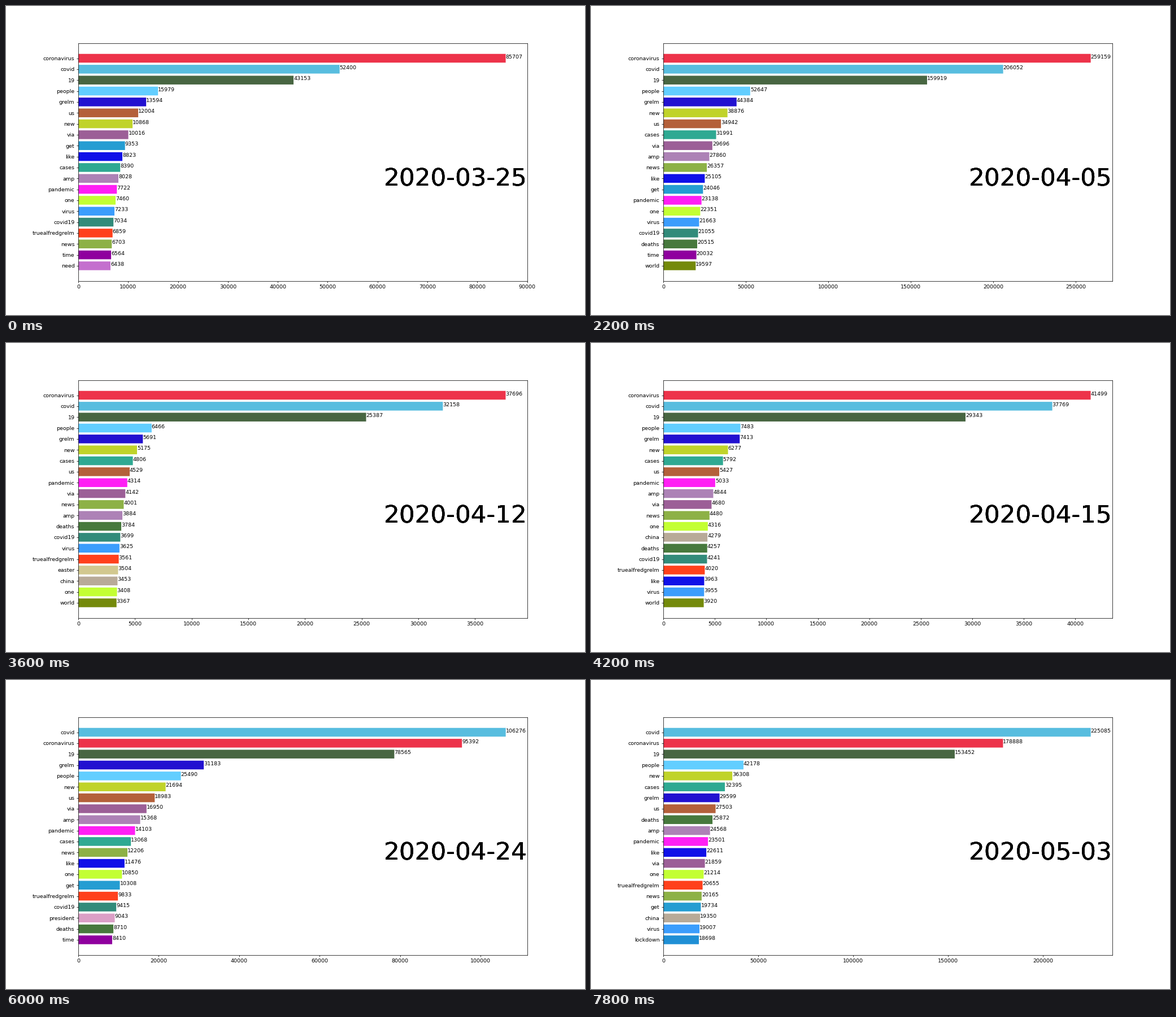
Write a matplotlib script that moves like this. It is 1025x547 px and loops after 8 s.

```python
import matplotlib.pyplot as plt
import numpy as np
from matplotlib.animation import FuncAnimation

W, H = 1025, 547
DPI = W / 15
DAYS, STEP = 40, 200
TOP = 20
START = np.datetime64("2020-03-25")

plt.rcParams["font.family"] = "DejaVu Sans"

# The katakana dash has no glyph in DejaVu Sans, so it shows as a box.
BOXED = "covid\u30fc19"
COLORS = {
    "coronavirus": "#ed334a", "covid": "#58bddf", "19": "#486642",
    "people": "#62ceff", "grelm": "#2211d0", "us": "#b4603a",
    "new": "#c0d32a", "via": "#9c5f97", "get": "#259dd2",
    "like": "#1010e8", "cases": "#2fa992", "amp": "#ad82b6",
    "pandemic": "#ff1ff4", "one": "#c3ff33", "virus": "#3b9dfc",
    "covid19": "#328b7a", "truealfredgrelm": "#ff401c", "news": "#8db146",
    "time": "#8f009e", "need": "#c46fce", BOXED: "#f0c44d",
    "china": "#b8aa98", "deaths": "#47793d", "world": "#748a0a",
    "easter": "#d2c88f", "president": "#db9fc6", "lockdown": "#1f8fd5",
}
WORDS = list(COLORS)

# Key days: day, counts of the first four ranks and the last, words by rank.
KEYS = [
    (0, (85707, 52400, 43153, 15979, 6438),
     "coronavirus covid 19 people grelm us new via get like cases amp "
     "pandemic one virus covid19 truealfredgrelm news time need"),
    (7, (257152, 197575, 158892, 47356, 22833),
     "coronavirus covid 19 people grelm us new via cases pandemic amp "
     + BOXED + " news like one covid19 china get time virus"),
    (11, (259159, 206052, 159919, 52647, 19597),
     "coronavirus covid 19 people grelm new us cases via amp news like "
     "get pandemic one virus covid19 deaths time world"),
    (18, (37696, 32158, 25387, 6466, 3367),
     "coronavirus covid 19 people grelm new cases us pandemic via news "
     "amp deaths covid19 virus truealfredgrelm easter china one world"),
    (25, (47172, 46803, 35592, 10546, 4725),
     "coronavirus covid 19 grelm people new cases us amp pandemic one "
     "china via like news covid19 deaths get world truealfredgrelm"),
    (30, (106276, 95392, 78565, 31183, 8410),
     "covid coronavirus 19 grelm people new us via amp pandemic cases "
     "news like one get truealfredgrelm covid19 president deaths time"),
    (39, (225085, 178888, 153452, 42178, 18698),
     "covid coronavirus 19 people new cases grelm us deaths amp pandemic "
     "like via one truealfredgrelm news get china virus lockdown"),
]


def key_counts(anchors, names):
    """Counts for every word: three leaders, then a hyperbolic tail."""
    *leaders, fourth, last = anchors
    t = np.linspace(0, 1, TOP - len(leaders))
    tail = last + (fourth - last) * (1 - t) / (1 + 4 * t)
    known = dict(zip(names.split(), [*leaders, *tail]))
    # Unranked words sit just below the last rank.
    return [known.get(word, 0.94 * last) for word in WORDS]


KEY_DAYS = [day for day, _, _ in KEYS]
KEY_LOGS = np.log([key_counts(anchors, names) for _, anchors, names in KEYS])


def ranking(day):
    counts = [round(float(np.exp(np.interp(day, KEY_DAYS, logs))))
              for logs in KEY_LOGS.T]
    pairs = zip(WORDS, counts)
    return sorted(pairs, key=lambda pair: -pair[1])[:TOP]


# The tiny margin keeps the pixel size from being truncated.
fig, ax = plt.subplots(figsize=((W + 1e-6) / DPI, (H + 1e-6) / DPI), dpi=DPI)


def draw(day):
    ax.clear()
    words, counts = zip(*ranking(day))
    rows = range(TOP - 1, -1, -1)
    ax.barh(rows, counts, color=[COLORS[word] for word in words], snap=False)
    ax.set_yticks(rows, words)
    # Rounding up to a ten keeps a tick that falls on the right edge.
    ax.set_xlim(0, 10 * np.ceil(1.05 * counts[0] / 10))
    for row, count in zip(rows, counts):
        ax.text(count, row, str(count))
    # Stacked copies give the date its firm, heavy edges.
    for _ in range(4):
        ax.text(1, 0.4, str(START + day), transform=ax.transAxes,
                size=46, ha="right")
    return []


anim = FuncAnimation(fig, draw, frames=DAYS, init_func=lambda: draw(0),
                     interval=STEP, repeat=True, repeat_delay=0)
plt.show()
```
